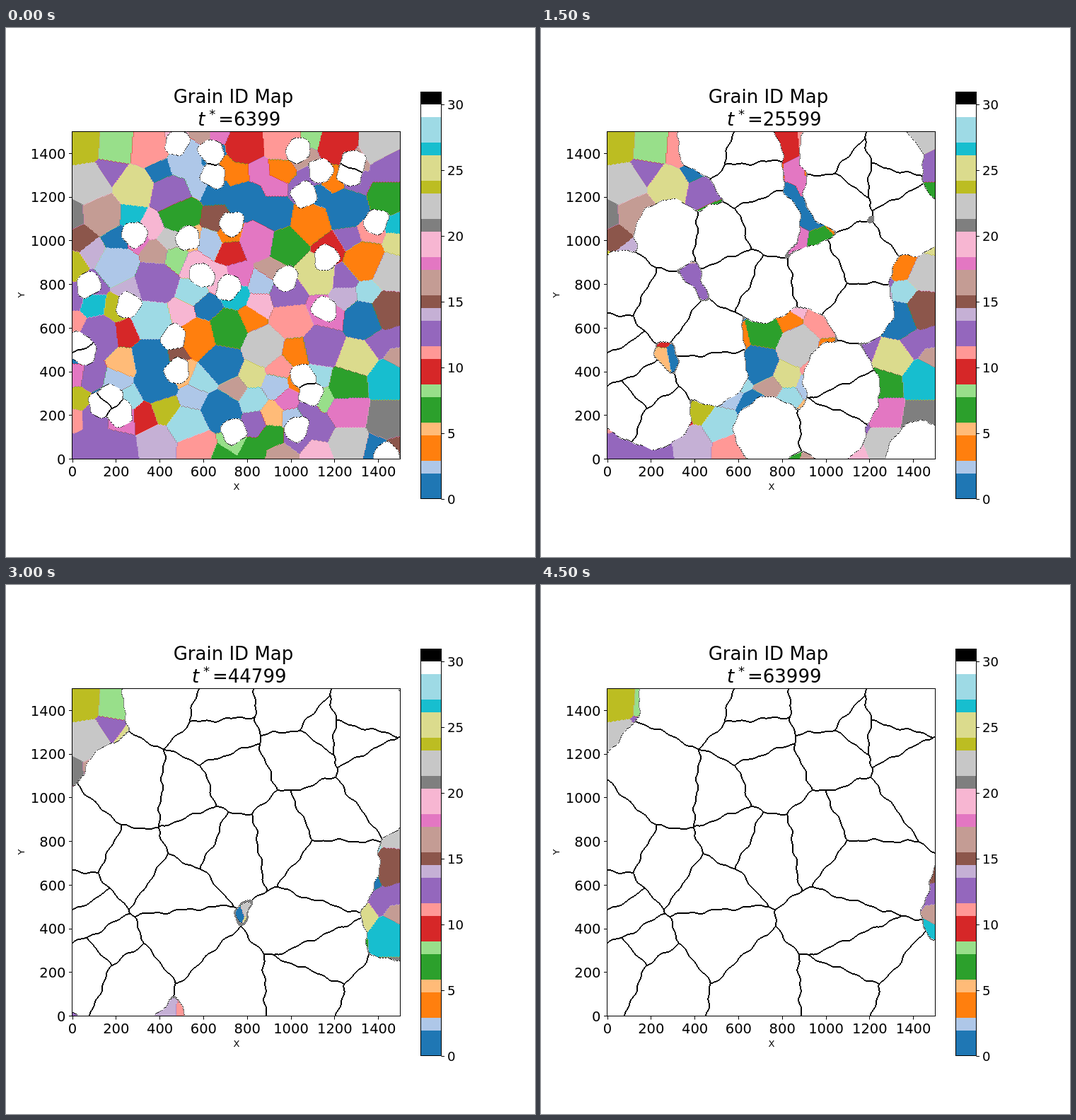
Write an HTML page with a canvas that moves like this. It is 748 px wide and 748 px high and loops after 5000 ms.

```html
<!DOCTYPE html>
<html lang="en">
<head>
<meta charset="utf-8">
<title>Grain ID Map</title>
<style>
html, body { margin: 0; width: 100%; height: 100%; overflow: hidden; background: #fff; }
canvas, svg { position: absolute; left: 0; top: 0; width: 748px; height: 748px; }
text { font-family: "DejaVu Sans", sans-serif; fill: #000; }
</style>
</head>
<body>
<canvas id="stage" width="748" height="748"></canvas>
<svg id="labels" viewBox="0 0 748 748"></svg>
<script>
const ctx = document.getElementById("stage").getContext("2d");
const svg = document.getElementById("labels");
const X0 = 94, Y0 = 146, SIZE = 464;

// colour and number of grain IDs that share it
const bar = [
  ["#1f77b4", 2], ["#aec7e8", 1], ["#ff7f0e", 2], ["#ffbb78", 1], ["#2ca02c", 2], ["#98df8a", 1],
  ["#d62728", 2], ["#ff9896", 1], ["#9467bd", 2], ["#c5b0d5", 1], ["#8c564b", 1], ["#c49c94", 2],
  ["#e377c2", 1], ["#f7b6d2", 2], ["#7f7f7f", 1], ["#c7c7c7", 2], ["#bcbd22", 1], ["#dbdb8d", 2],
  ["#17becf", 1], ["#9edae5", 2], ["#ffffff", 1], ["#000000", 1]
];
const idColors = bar.flatMap(([color, n]) => Array(n).fill(color));
const MATRIX_IDS = 30;

// Centres of the largest matrix grains, by colour
const large = {
  "#1f77b4": [[340, 243], [378, 263], [481, 256], [505, 412], [205, 465], [212, 500], [305, 473], [303, 541]],
  "#aec7e8": [[155, 335]],
  "#ff7f0e": [[428, 272], [507, 328], [271, 437]],
  "#2ca02c": [[543, 238], [244, 262], [394, 306], [313, 427], [483, 503]],
  "#98df8a": [[155, 163]],
  "#d62728": [[336, 164], [468, 163]],
  "#ff9896": [[201, 167], [391, 160], [403, 408], [268, 592]],
  "#9467bd": [[232, 235], [543, 197], [400, 377], [211, 358], [130, 435], [450, 450], [112, 597], [157, 599]],
  "#c5b0d5": [[214, 591]],
  "#8c564b": [[541, 398]],
  "#c49c94": [[135, 262]],
  "#e377c2": [[358, 300], [484, 543]],
  "#7f7f7f": [[538, 552]],
  "#c7c7c7": [[118, 222], [527, 167], [545, 345], [363, 450], [484, 585]],
  "#bcbd22": [[108, 160]],
  "#dbdb8d": [[181, 225], [437, 350], [494, 467]],
  "#17becf": [[539, 499]],
  "#9edae5": [[205, 415], [257, 563]]
};

// Where new grains start
const nuclei = [
  [241, 161], [290, 174], [293, 208], [413, 173], [421, 235], [444, 201], [490, 189], [486, 206],
  [522, 273], [181, 291], [257, 297], [318, 276], [277, 349], [314, 367], [395, 353], [452, 325],
  [116, 363], [172, 392], [450, 396], [237, 437], [242, 484], [103, 447], [110, 459], [420, 492],
  [430, 516], [146, 521], [133, 533], [162, 545], [321, 570], [410, 566], [538, 604]
];

let seed = 7;
function random() {
  seed = (seed * 1664525 + 1013904223) % 4294967296;
  return seed / 4294967296;
}

// Small grains fill the room between the large ones
function makeSites() {
  const sites = Object.entries(large).flatMap(([color, points]) =>
    points.map(([x, y]) => ({ x, y, r: 25, id: idColors.indexOf(color) })));
  for (let i = 0; i < 8000; i++) {
    const s = { x: X0 + random() * SIZE, y: Y0 + random() * SIZE, r: 13, id: Math.floor(random() * MATRIX_IDS) };
    if (sites.every(o => Math.hypot(o.x - s.x, o.y - s.y) > .95 * (o.r + s.r))) sites.push(s);
  }
  return sites;
}

const cell = new Uint16Array(SIZE * SIZE);
const owner = new Uint8Array(SIZE * SIZE);
const reach = new Float32Array(SIZE * SIZE);
const sites = makeSites();

function buildMaps() {
  for (let p = 0; p < SIZE * SIZE; p++) {
    const x = X0 + p % SIZE, y = Y0 + Math.floor(p / SIZE);
    let best = Infinity;
    sites.forEach((s, i) => {
      const d = (x - s.x) ** 2 + (y - s.y) ** 2 - s.r * s.r;
      if (d < best) { best = d; cell[p] = i; }
    });
    // slightly bent space roughens the fronts and seams
    const wx = x + 1.6 * Math.sin(y / 7 + x / 31) + Math.sin(y / 3.3);
    const wy = y + 1.6 * Math.sin(x / 8 - y / 27) + Math.sin(x / 3.7);
    let sum = 0;
    best = Infinity;
    nuclei.forEach(([nx, ny], i) => {
      const d = (wx - nx) ** 2 + (wy - ny) ** 2 + .01;
      sum += 1 / (d * d * d * d);
      if (d < best) { best = d; owner[p] = i; }
    });
    // smooth minimum of the distances: necks between neighbours close early
    reach[p] = sum ** -.125;
  }
}

// A neighbour in another grain, or -1
function across(map, p) {
  const x = p % SIZE, v = map[p];
  if (x > 0 && map[p - 1] !== v) return p - 1;
  if (x < SIZE - 1 && map[p + 1] !== v) return p + 1;
  if (p >= SIZE && map[p - SIZE] !== v) return p - SIZE;
  if (p < SIZE * (SIZE - 1) && map[p + SIZE] !== v) return p + SIZE;
  return -1;
}

const rgb = idColors.map(c => [1, 3, 5].map(i => parseInt(c.slice(i, i + 2), 16)));
const WHITE = 30, BLACK = 31;

function idAt(p, radius) {
  const dot = (p % SIZE + 2 * Math.floor(p / SIZE)) % 4;
  if (reach[p] <= radius) return across(owner, p) < 0 ? WHITE : BLACK;
  if (reach[p] < radius + 1) return dot < 2 ? BLACK : WHITE;
  const id = sites[cell[p]].id;
  const q = dot === 0 ? across(cell, p) : -1;
  return q < 0 ? id : Math.floor((id + sites[cell[q]].id) / 2);
}

const image = ctx.createImageData(SIZE, SIZE);
function drawMap(step) {
  const radius = 17 + 10.8 * step - .18 * step * step;
  for (let p = 0; p < SIZE * SIZE; p++) {
    image.data.set(rgb[idAt(p, radius)], 4 * p);
    image.data[4 * p + 3] = 255;
  }
  ctx.putImageData(image, X0, Y0);
}

const xAt = v => X0 + v * 463.5 / 1500;
const yAt = v => 609.5 - v * 463 / 1500;
const barY = v => 666 - v * 576 / 31;
const snap = v => Math.floor(v) + .5;

function tick(x, y, dx, dy) {
  ctx.beginPath();
  ctx.moveTo(x, y);
  ctx.lineTo(x + dx, y + dy);
  ctx.stroke();
}

function drawFrame() {
  let y = 666;
  for (const [color, n] of bar) {
    ctx.fillStyle = color;
    ctx.fillRect(587, y - 18 * n, 28.5, 18 * n);
    y -= 18 * n;
  }
  ctx.strokeStyle = "#000";
  ctx.lineWidth = 1;
  ctx.strokeRect(586.5, 90.5, 29, 575);
  ctx.strokeRect(93.5, 146.5, 464, 463);
  for (let v = 0; v <= 1400; v += 200) {
    tick(snap(xAt(v)), 610, 0, 4.5);
    tick(93.5, snap(yAt(v)), -4.5, 0);
  }
  for (let v = 0; v <= 30; v += 5) tick(615.5, snap(barY(v)), 4.5, 0);
}

function label(str, x, y, size, anchor = "middle") {
  const el = document.createElementNS(svg.namespaceURI, "text");
  el.textContent = str;
  el.setAttribute("x", x);
  el.setAttribute("y", y);
  el.setAttribute("font-size", size);
  el.setAttribute("text-anchor", anchor);
  svg.append(el);
  return el;
}

for (let v = 0; v <= 1400; v += 200) {
  label(v, xAt(v), 634, 19.5);
  label(v, 84.5, yAt(v) + 7.3, 19.5, "end");
}
for (let v = 0; v <= 30; v += 5) label(v, 624, barY(v) + 6.8, 18.2, "start");
label("X", 326, 653, 13);
label("Y", 26, 377.5, 13).setAttribute("transform", "rotate(-90 26 377.5)");
label("Grain ID Map", 321.5, 106, 26);
const tee = label("t", 0, 137.5, 26, "start");
tee.setAttribute("font-style", "italic");
const star = label("*", 0, 128, 18.2, "start");
const count = label("", 0, 137.5, 26, "start");

function drawCount(step) {
  const value = String(6399 + 6400 * step);
  const x = 304.5 - 8.3 * value.length;
  count.textContent = "=" + value;
  tee.setAttribute("x", x);
  star.setAttribute("x", x + 16);
  count.setAttribute("x", x + 29);
}

let shown = -1;
function play(time) {
  const step = Math.floor(time / 500) % 10;
  if (step === shown) return;
  shown = step;
  ctx.clearRect(0, 0, 748, 748);
  drawMap(step);
  drawFrame();
  drawCount(step);
}

buildMaps();
const start = performance.now();
function loop() {
  play(performance.now() - start);
  requestAnimationFrame(loop);
}
loop();
</script>
</body>
</html>
```
